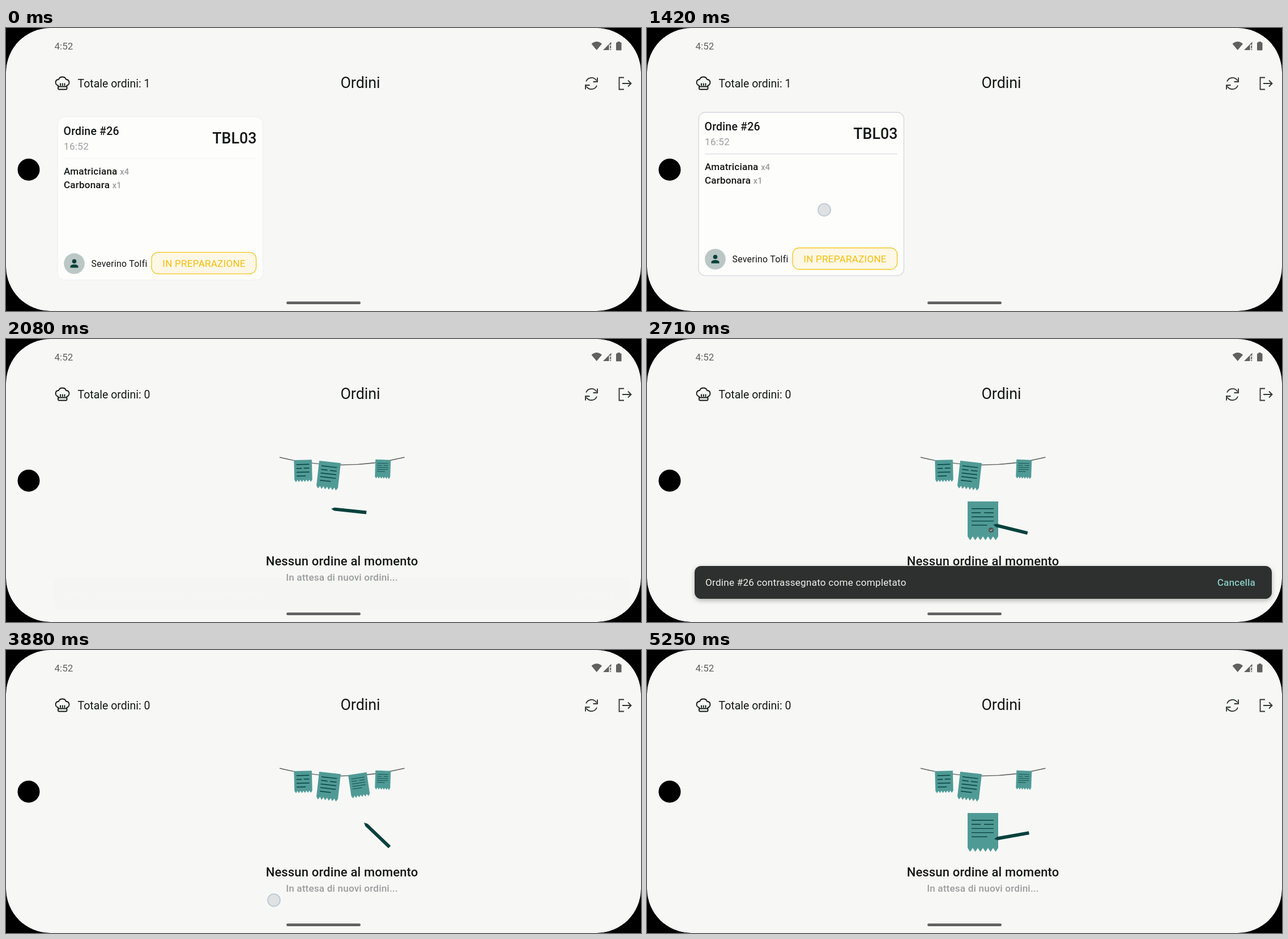
Animation, 1121 px wide and 500 px high, one loop 5290 ms. Source, as an HTML page:

```html
<!DOCTYPE html>
<html lang="it">
<head>
<meta charset="utf-8">
<title>Ordini</title>
<style>
  html, body { margin: 0; width: 100%; height: 100%; overflow: hidden; background: #000; }
  svg { display: block; width: 100%; height: 100%; font-family: Roboto, "Open Sans", sans-serif; fill: #151716; }
  .m { font-weight: 500; }
  .s14 { font-size: 17.1px; }
  .s16 { font-size: 19.5px; }
  .s22 { font-size: 26.8px; }
  .gray { fill: #9b9c9d; }
  .icon { fill: none; stroke: #333635; stroke-width: 1.9; }
  .sys { fill: #5f605f; }
  .paper { fill: #509a96; }
  .ink { fill: none; stroke: #06413d; }
  #snack { filter: drop-shadow(0 3px 4px rgba(0, 0, 0, .28)); }
</style>
</head>
<body>
<svg viewBox="0 0 1121 500">
  <defs><clipPath id="list"><rect y="134" width="1121" height="366"/></clipPath></defs>
  <rect width="1121" height="500" fill="#000"/>
  <rect width="1121" height="500" rx="78" fill="#f7f8f6"/>

  <g class="sys">
    <text class="s14" x="85.5" y="38">4:52</text>
    <path d="M1042.7 39L1033.5 28Q1042.7 20 1052 28Z"/>
    <path d="M1054 39L1068.5 24.5V29.5H1064.5V39ZM1066.3 31H1068.2V36H1066.3ZM1066.3 37.2H1068.2V39H1066.3Z"/>
    <path d="M1079.5 25.5V24H1084V25.5H1085.5Q1086.5 25.5 1086.5 26.5V38.5Q1086.5 39.5 1085.5 39.5H1078Q1077 39.5 1077 38.5V26.5Q1077 25.5 1078 25.5Z"/>
  </g>

  <path class="icon" style="stroke:#151716" stroke-linejoin="round" d="M92 101.5C86 100.5 86 91 93 91C94.500 85 104.500 85 106 91C113 91 113 100.500 107.500 101.500V107Q107.500 108.500 106 108.500H93.500Q92 108.500 92 107ZM92 103.500H107.500M96 97.500V102M99.700 97.500V102M103.500 97.500V102"/>
  <text id="total" class="s16" x="126.500" y="104.500"></text>
  <text class="s22" x="625.500" y="106" text-anchor="middle">Ordini</text>
  <path class="icon" d="M1024 94.500A10.300 10.300 0 0 1 1042.500 93M1044 87.500V95H1036.500M1043 101.500A10.300 10.300 0 0 1 1024.500 103M1023 108.500V101H1030.500"/>
  <path class="icon" d="M1091 87.500H1082.500V108.500H1091M1088 98H1103M1098 92.500L1103.500 98L1098 103.500"/>

  <g clip-path="url(#list)">
    <g id="card">
      <rect x="91" y="156.800" width="362.500" height="288.700" rx="12" fill="#fdfdfc"/>
      <g id="edges" fill="none" stroke="#dedfe3">
        <rect x="91" y="156.800" width="362.500" height="288.700" rx="12" stroke-width="1.800"/>
        <path d="M102.500 230.300H442" stroke-width="1.300"/>
      </g>
      <text class="m s16" x="101.500" y="189" letter-spacing=".18">Ordine #26</text>
      <text class="s14 gray" x="102" y="214.500" letter-spacing=".3">16:52</text>
      <text class="m s22" x="442.500" y="203.500" text-anchor="end">TBL03</text>
      <g class="m s14" letter-spacing=".18">
        <text x="102" y="258.500">Amatriciana</text>
        <text x="102" y="282.500">Carbonara</text>
      </g>
      <g class="m gray" font-size="14.600" letter-spacing=".2">
        <text x="201.300" y="258.500">x4</text>
        <text x="187.800" y="282.500">x1</text>
      </g>
      <circle cx="120.500" cy="416.300" r="18.300" fill="#bac7c5"/>
      <g fill="#06413d">
        <circle cx="120.500" cy="412.300" r="3.800"/>
        <path d="M113.500 423.500V421.500C113.500 416.500 127.500 416.500 127.500 421.500V423.500Z"/>
      </g>
      <text x="150.500" y="422" font-size="15.900" letter-spacing=".25">Severino Tolfi</text>
      <rect x="257" y="396.300" width="184.600" height="38" rx="11.500" fill="#fdf7e6" stroke="#f1c51c" stroke-width="1.300"/>
      <text class="s14" x="349.600" y="421.500" text-anchor="middle" letter-spacing=".22" style="fill:#f3bf0c">IN PREPARAZIONE</text>
    </g>
  </g>

  <g id="empty">
    <path d="M483 209Q593 236 703.500 209" fill="none" stroke="#5f605f" stroke-width="1.300"/>
    <g id="art"></g>
    <text class="m" x="593" y="399.700" font-size="21.950" text-anchor="middle" letter-spacing=".18">Nessun ordine al momento</text>
    <text class="m s14 gray" x="593" y="426.700" text-anchor="middle" letter-spacing=".18">In attesa di nuovi ordini...</text>
  </g>

  <g id="snack">
    <rect x="84" y="401" width="1019" height="58" rx="11.500" fill="#2d302e"/>
    <text class="s14" x="103" y="436" letter-spacing=".25" style="fill:#eff1ee">Ordine #26 contrassegnato come completato</text>
    <text class="m s14" x="1073.800" y="436" text-anchor="end" letter-spacing=".12" style="fill:#87c9c3">Cancella</text>
  </g>

  <circle id="touch" r="11" fill="#e0e1e2" stroke="#b7c5d6" stroke-width="1.600"/>
  <rect class="sys" x="495" y="483.300" width="131" height="4.800" rx="2.400"/>
  <circle cx="40" cy="250.300" r="19.500" fill="#000"/>
  <path fill="#000" fill-rule="evenodd" d="M0 0H1121V500H0ZM78 0A78 78 0 0 0 0 78V422A78 78 0 0 0 78 500H1043A78 78 0 0 0 1121 422V78A78 78 0 0 0 1043 0Z"/>
</svg>
<script>
const LOOP = 5290, ART_START = 2100, ART_LOOP = 2650;
const $ = id => document.getElementById(id);

function add(parent, tag, attrs) {
  const el = document.createElementNS("http://www.w3.org/2000/svg", tag);
  for (const k in attrs) el.setAttribute(k, attrs[k]);
  return parent.appendChild(el);
}

// Linear interpolation through rows of [time, ...values].
function track(rows, t) {
  if (t <= rows[0][0]) return rows[0].slice(1);
  for (let i = 1; i < rows.length; i++) {
    const a = rows[i - 1], b = rows[i];
    if (t < b[0]) {
      const k = (t - a[0]) / (b[0] - a[0]);
      return a.slice(1).map((v, j) => v + (b[j + 1] - v) * k);
    }
  }
  return rows[rows.length - 1].slice(1);
}

const place = (x, y, rot, s = 1) => `translate(${x} ${y}) rotate(${rot}) scale(${s})`;

// A torn slip: toothed bottom edge and `n` written rows, the second one split.
function slip({ x = 0, y = 0, rot = 0, w, h, n, top, gap, ink }) {
  const g = add($("art"), "g", { transform: place(x, y, rot) });
  const teeth = 6, step = w / teeth, bite = h * 0.1;
  let d = `M0 0H${w}V${h - bite}`;
  for (let i = 0; i < teeth; i++) {
    d += `L${w - (i + 0.5) * step} ${h}L${w - (i + 1) * step} ${h - bite}`;
  }
  add(g, "path", { d: d + "Z", class: "paper" });
  const l = w * 0.13, r = w * 0.85;
  const rows = Array.from({ length: n }, (_, i) => {
    const ly = top + i * gap;
    const path = i === 1
      ? `M${l} ${ly}H${w * 0.43}M${w * 0.54} ${ly}H${r}`
      : `M${l} ${ly}H${i === n - 1 ? w * 0.64 : r}`;
    return add(g, "path", { d: path, class: "ink", "stroke-width": ink, pathLength: 1 });
  });
  return { g, rows };
}

slip({ x: 508.3, y: 214, rot: -1.5, w: 31.5, h: 39, n: 4, top: 8, gap: 6.8, ink: 1.5 });
slip({ x: 553, y: 215, rot: 6.5, w: 38.2, h: 49, n: 5, top: 8.5, gap: 6.4, ink: 1.5 });
slip({ x: 652.3, y: 212.8, rot: 2, w: 27, h: 33.5, n: 5, top: 6.5, gap: 3.6, ink: 0.8 });

const order = slip({ w: 54, h: 68.5, n: 5, top: 12.7, gap: 7.3, ink: 1.4 });
const check = add(order.g, "g", {});
add(check, "circle", { cx: 41.5, cy: 50.5, r: 4.6, fill: "#4a5856" });
add(check, "path", { d: "M39.5 50.500L41 52L43.700 49", fill: "none", stroke: "#fff", "stroke-width": 1 });
const pen = add($("art"), "path", { d: "M0 0L6 -3H62.500V3H6Z", fill: "#06413d" });

const ROW = 84;
const penRows = [];
for (let i = 0; i < 5; i++) {
  const y = 300 + i * 7.3;
  penRows.push([i * ROW, 574, y, 6], [i * ROW + 66, i === 4 ? 601 : 612, y, -4]);
}
penRows.push([500, 613, 334, -10.2], [545, 606, 337, -4], [610, 611, 328, 13.8],
  [820, 632, 305, 43.7], [2480, 632, 305, 43.7], [ART_LOOP, 574, 300, 6]);

const cardRows = [[1340, 0], [1420, -7], [1500, -70], [1580, -190], [1690, -320]];
const swipes = [
  { from: 1300, to: 1570, rows: [[1320, 313, 346], [1420, 313, 322], [1500, 313, 262], [1570, 313, 190]] },
  { from: 3630, to: 3920, rows: [[3640, 473, 412], [3760, 473, 430], [3880, 473, 442]] }
];
const snackRows = [[2080, 20, 0], [2320, 0, 1], [3660, 0, 1], [3740, 22, 1], [3840, 110, 1]];

const show = (el, on) => el.setAttribute("visibility", on ? "visible" : "hidden");

function drawArt(p) {
  const f = Math.min(1, Math.max(0, (p - 700) / 450));
  const e = f * f * (3 - 2 * f);
  const settle = 6 * Math.max(0, 1 - p / 610);
  order.g.setAttribute("transform",
    place(566 + 38 * e, 287 + settle - 66 * e, -8.5 * e, 1 - 0.389 * e));
  order.g.setAttribute("opacity", Math.min(1, p / 80));
  order.rows.forEach((row, i) => {
    const k = Math.min(1, Math.max(0, (p - i * ROW) / 66));
    row.setAttribute("stroke-dasharray", k < 1 ? `${k} 2` : "none");
    show(row, k > 0);
  });
  check.setAttribute("opacity", track([[545, 0], [595, 1], [750, 1], [1000, 0]], p)[0]);
  pen.setAttribute("transform", place(...track(penRows, p)));
}

function draw(t) {
  const done = t >= 2040;
  $("total").textContent = "Totale ordini: " + (done ? 0 : 1);
  $("card").setAttribute("transform", `translate(0 ${track(cardRows, t)[0]})`);
  $("card").style.display = t < 1700 ? "" : "none";
  $("edges").setAttribute("opacity", track([[40, 0.3], [400, 1]], t)[0]);

  $("empty").style.display = done ? "" : "none";
  drawArt(Math.max(0, t - ART_START) % ART_LOOP);

  const [dy, alpha] = track(snackRows, t);
  $("snack").setAttribute("transform", `translate(0 ${dy})`);
  $("snack").setAttribute("opacity", alpha);
  $("snack").style.display = t > 2080 && t < 3840 ? "" : "none";

  const swipe = swipes.find(s => t >= s.from && t < s.to);
  show($("touch"), swipe);
  if (swipe) {
    const [x, y] = track(swipe.rows, t);
    $("touch").setAttribute("transform", `translate(${x} ${y})`);
  }
}

const start = performance.now();
function tick() {
  draw((performance.now() - start) % LOOP);
  requestAnimationFrame(tick);
}
tick();
</script>
</body>
</html>
```
